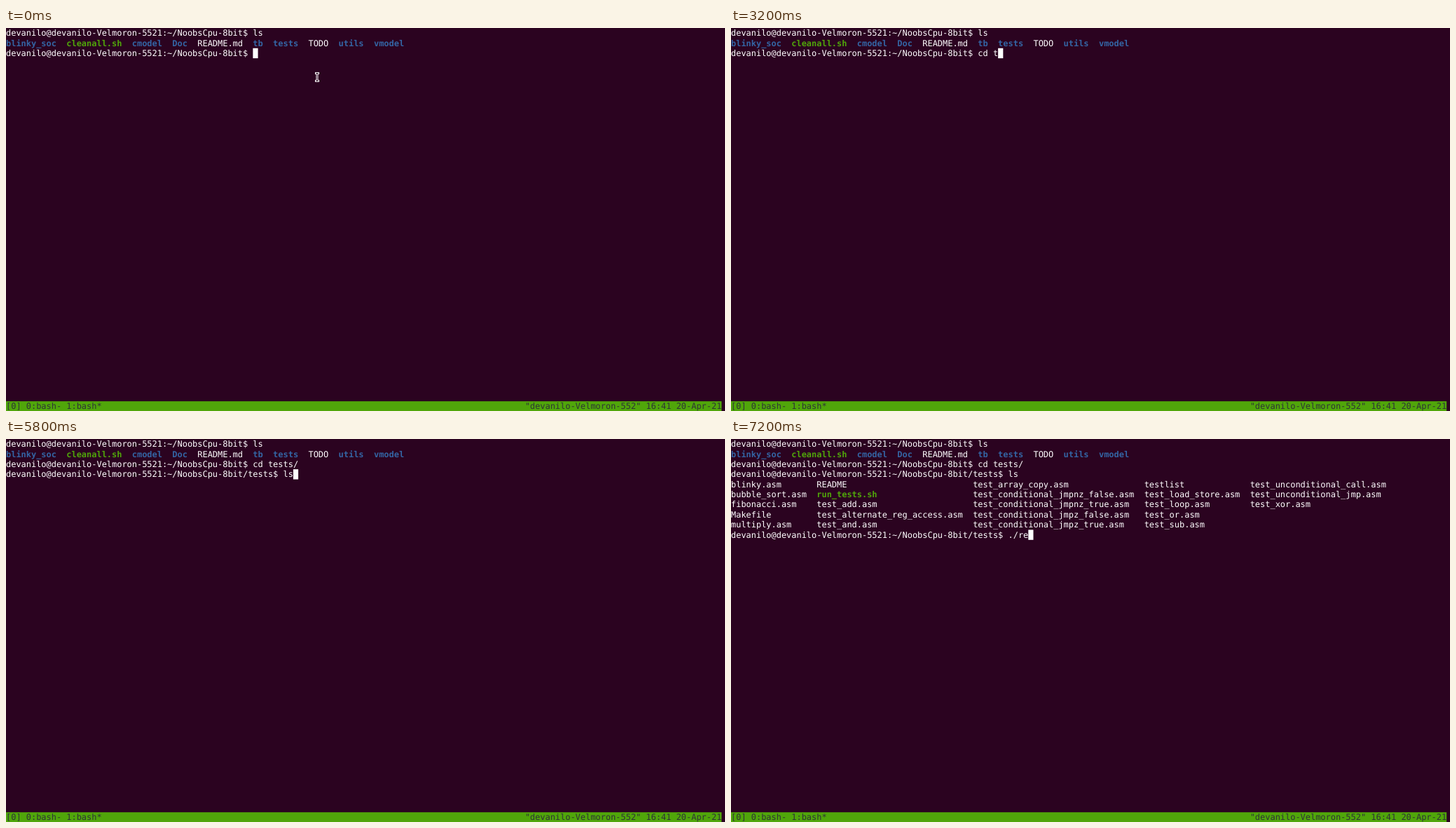
Animation, 1026 px wide and 546 px high, one loop 8000 ms. Source, as an HTML page with a canvas:

```html
<!DOCTYPE html>
<html lang="en">
<head>
<meta charset="utf-8">
<title>Terminal session</title>
<style>
html, body { margin: 0; height: 100%; overflow: hidden; background: #2b0320; }
canvas { display: block; }
</style>
</head>
<body>
<canvas id="stage" width="1026" height="546"></canvas>
<script>
const ctx = document.getElementById('stage').getContext('2d');
const LOOP = 8000, SCALE = 0.799, CELL_W = 9, CELL_H = 18;
const BG = '#2b0320', WHITE = '#ffffff', BLUE = '#3465a4', GREEN = '#50a60a', DARK = '#2e3436';

const HOST = 'devanilo-Velmoron-5521';
const HOME = `devanilo@${HOST}:~/NoobsCpu-8bit`;
const PROMPT = HOME + '$ ', TEST_PROMPT = HOME + '/tests$ ';

const ROOT_FILES = 'blinky_soc/ cleanall.sh cmodel/ Doc/ README.md tb/ tests/ TODO utils/ vmodel/'.split(' ');
const TEST_FILES = [
  [0, 'blinky.asm bubble_sort.asm fibonacci.asm Makefile multiply.asm'],
  [17, 'README run_tests.sh test_add.asm test_alternate_reg_access.asm test_and.asm'],
  [48, 'test_array_copy.asm test_conditional_jmpnz_false.asm test_conditional_jmpnz_true.asm test_conditional_jmpz_false.asm test_conditional_jmpz_true.asm'],
  [82, 'testlist test_load_store.asm test_loop.asm test_or.asm test_sub.asm'],
  [103, 'test_unconditional_call.asm test_unconditional_jmp.asm test_xor.asm']
];

// [time, typed so far]
const CD_KEYS = [[2700, 'cd'], [2900, 'cd '], [3200, 'cd t'], [4000, 'cd te'], [4200, 'cd tes'], [4800, 'cd tests/']];
const LS_KEYS = [[5800, 'ls']];
const RUN_KEYS = [[6900, '.'], [7000, './'], [7100, './r'], [7200, './re']];
const CURSOR_OFF = [[400, 1000], [2000, 2200], [5400, 5600], [6400, 6900]];

const typed = (keys, t) => keys.reduce((s, [at, text]) => t >= at ? text : s, '');

function box(col, row, cols, color) {
  ctx.fillStyle = color;
  ctx.fillRect(col * CELL_W, row * CELL_H, cols * CELL_W, CELL_H);
}

// Each character sits in its own terminal cell.
function print(col, row, text, color = WHITE, bold = false) {
  ctx.font = `${bold ? 'bold ' : ''}15px "DejaVu Sans Mono", monospace`;
  ctx.textRendering = 'geometricPrecision';
  ctx.fillStyle = color;
  [...text].forEach((ch, i) => ctx.fillText(ch, (col + i) * CELL_W, row * CELL_H + 14));
}

function printFile(col, row, name) {
  const dir = name.endsWith('/'), script = name.endsWith('.sh');
  const label = dir ? name.slice(0, -1) : name;
  print(col, row, label, dir ? BLUE : script ? GREEN : WHITE, dir || script);
  return col + label.length + 2;
}

function drawPointer() {
  const bars = (color, ...rects) => {
    ctx.fillStyle = color;
    rects.forEach(r => ctx.fillRect(...r));
  };
  bars(WHITE, [441, 63, 6, 3], [442.5, 63, 3, 14], [441, 74, 6, 3]);
  bars(BG, [442, 64, 4, 1], [443.5, 64, 1, 12], [442, 75, 4, 1]);
}

function draw(t) {
  ctx.setTransform(1, 0, 0, 1, 0, 0);
  ctx.fillStyle = BG;
  ctx.fillRect(0, 0, 1026, 546);
  if (t < 2600) drawPointer();
  ctx.scale(SCALE, SCALE);

  print(0, 0, PROMPT + 'ls');
  ROOT_FILES.reduce((col, name) => printFile(col, 1, name), 0);

  let row = 2, line = PROMPT + typed(CD_KEYS, t);
  print(0, row, line);
  if (t >= 4800) {
    row = 3;
    line = TEST_PROMPT + typed(LS_KEYS, t);
    print(0, row, line);
  }
  if (t >= 5900) {
    for (const [col, names] of TEST_FILES)
      names.split(' ').forEach((name, i) => printFile(col, 4 + i, name));
    row = 9;
    line = TEST_PROMPT + typed(RUN_KEYS, t);
    print(0, row, line);
  }
  if (!CURSOR_OFF.some(([from, to]) => t >= from && t < to)) box(line.length, row, 1, WHITE);

  box(0, 37, 142, GREEN);
  print(0, 37, '[0] 0:bash- 1:bash*', DARK);
  print(103, 37, `"${HOST.slice(0, 21)}" 16:41 20-Apr-21`, DARK);
}

const start = performance.now();
function tick() {
  draw((performance.now() - start) % LOOP);
  requestAnimationFrame(tick);
}
tick();
</script>
</body>
</html>
```
